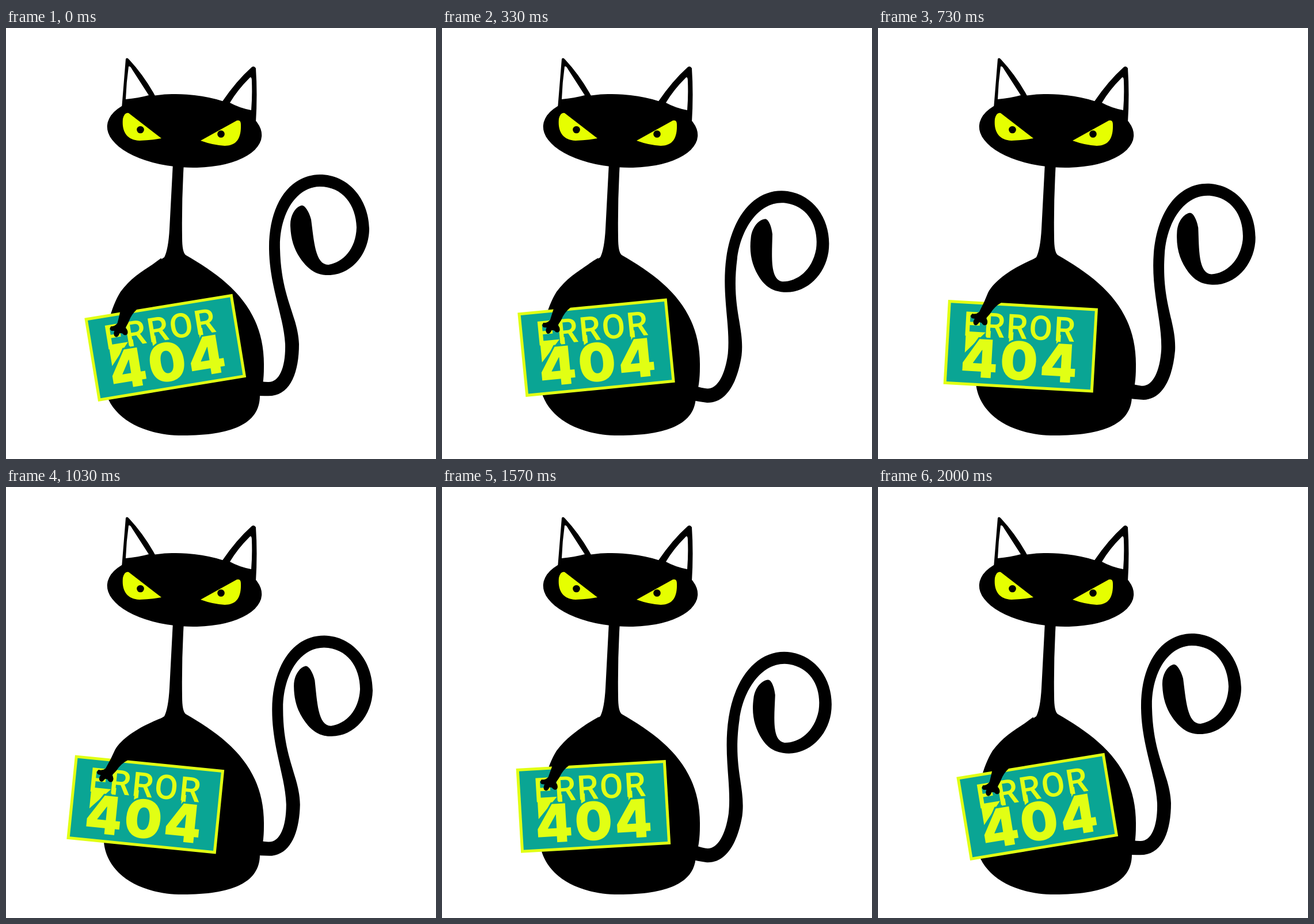
An HTML page that plays this animation: 747x750 px, repeating every 2030 ms.

```html
<!DOCTYPE html>
<html lang="en">
<head>
<meta charset="utf-8">
<title>Error 404 cat</title>
<style>
html, body { margin: 0; width: 100%; height: 100%; overflow: hidden; background: #fff; }
svg { display: block; width: 100vw; height: 100vh; }
.lime { fill: #e1ff14; }
.eyes { fill: #e6ff00; }
.error { font: 500 59px Roboto, "Open Sans", sans-serif; letter-spacing: 2.5px; }
.code {
  font: 900 92px Inter, "Open Sans", sans-serif; letter-spacing: 4px; text-anchor: middle;
  stroke: #0aa594; stroke-width: 6px; paint-order: stroke;
}
</style>
</head>
<body>
<svg viewBox="0 0 747 750">
  <path id="tail" d="M400 637Q430 641 462 640C495 636 509 598 509 550C507 500 478 470 476 385
    C474 330 500 277 545 276C585 276 608 308 609 347C608 385 585 408 560 412
    C537 412 535 370 530 333C526 318 518 307 513 309C504 311 493 325 494 345
    C495 375 505 395 520 412C535 428 548 430 560 430C600 430 631 393 631 349
    C630 298 595 255 545 255C490 256 456 310 457 385C458 450 482 500 485 550
    C486 590 475 617 455 616C440 616 420 610 400 608Z"/>
  <path d="M290 235H309Q305 300 306 365Q306 390 312 395C385 437 450 488 448 590Q448 622 441 640
    C441 690 390 709 307 709C230 709 175 672 170 618C166 550 178 493 199 459
    C220 430 250 415 275 399Q282 385 284 350Z"/>
  <g id="head">
    <path d="M201 140L208 54Q210 50 214 55Q240 83 259 118ZM375 129Q400 92 427 68Q431 65 434 70Q437 115 434 164Z"/>
    <ellipse cx="310" cy="179" rx="134.5" ry="63.5" transform="rotate(4 310 179)"/>
    <path fill="#fff" d="M213 67Q216 66 219 72L248 117Q230 122 208 124Q209 95 213 67Z
      M423 87Q427 83 427 93Q428 118 426 143Q405 139 389 130Q402 108 423 87Z"/>
    <path class="eyes" d="M213 148L270 192Q255 195 232 196C208 195 201 178 203 158Q206 146 213 148Z
      M338 196L401 161Q408 159 408 168C409 195 398 205 380 205Q360 204 338 196Z"/>
    <circle cx="233.5" cy="177" r="6.3"/>
    <circle cx="373.5" cy="184.5" r="6.3"/>
  </g>
  <g id="sign">
    <g transform="translate(125 481.5)" class="lime">
      <rect width="260.5" height="147"/>
      <rect x="5" y="5" width="250.5" height="137" fill="#0aa594"/>
      <text class="error" x="28.5" y="60.5">ERROR</text>
      <path d="M34 53H68L34 90ZM70 50h7v22h-7zM109.500 50h7v22h-7zM192 50h7v32h-7z"/>
      <text class="code" x="131" y="132">404</text>
    </g>
    <path transform="rotate(-3.2 274 423.6)" d="M275 400C240 414 203 437 191 461Q185 477 176 494
      Q170 499 164 497Q159 501 163 505L168 506Q164 512 167 516Q171 520 176 512L180 513
      Q184 520 189 516Q192 511 188 505L195 497Q202 485 214 478L260 450Z"/>
  </g>
</svg>
<script>
const [tail, head, sign] = ["tail", "head", "sign"].map(id => document.getElementById(id));
const swing = p => (1 - Math.cos(Math.PI * p)) / 2;
const tailStops = [0, 15, 28, 42.3, 60];

function tailAngle(n) {
  const i = Math.min(3, tailStops.findLastIndex(s => s <= n));
  const p = swing((n - tailStops[i]) / (tailStops[i + 1] - tailStops[i]));
  return 11.6 * (i % 2 ? 1 - p : p);
}

// The head ducks briefly once per second.
function headScale(n) {
  const p = (n % 30 - 3) / 7;
  return p > 0 && p < 1 ? 1 - 0.071 * Math.sin(Math.PI * p) ** 2 : 1;
}

function draw() {
  const n = Math.floor((performance.now() % 2030 + 4) * 0.03); // 30 steps a second
  const scale = headScale(n);
  tail.setAttribute("transform", `rotate(${tailAngle(n)} 383 635)`);
  head.setAttribute("transform", `matrix(1 0 0 ${scale} 0 ${243 * (1 - scale)})`);
  sign.setAttribute("transform", `rotate(${-9.3 + 15.05 * swing(n / 30)} 274 423.6)`);
  requestAnimationFrame(draw);
}
draw();
</script>
</body>
</html>
```
